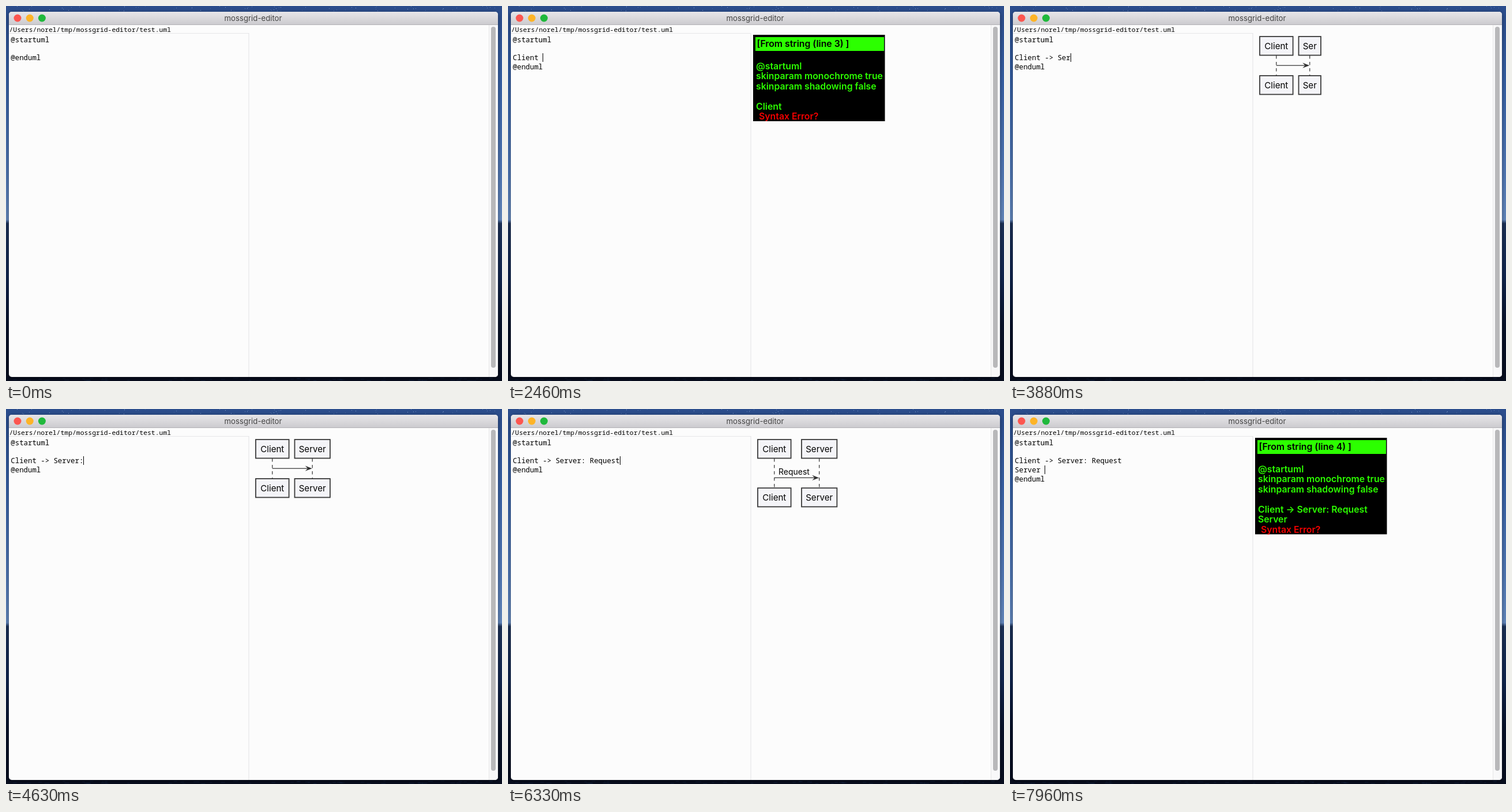
Animation of 860 by 651 pixels, one loop 8 s. Source, as an HTML page with a canvas:

```html
<!DOCTYPE html>
<html lang="en">
<head>
<meta charset="utf-8">
<title>Diagram editor</title>
<style>
  html, body { margin: 0; width: 100%; height: 100%; overflow: hidden; background: #0a1226; }
  canvas { display: block; width: 860px; height: 651px; }
</style>
</head>
<body>
<canvas id="stage" width="860" height="651"></canvas>
<script>
const ctx = document.getElementById('stage').getContext('2d');
const W = 860, H = 651, LOOP = 8000;
const SANS = 'Inter, "Noto Sans", sans-serif';
const MONO = '"Noto Sans Mono", "DejaVu Sans Mono", monospace';
const GREEN = '#2cff00', INK = '#303030';
const RENDER_LAG = 80;

// Keystrokes: [text, time of the first key, time between keys]
const BURSTS = [
  ['\n', 500, 0], ['Client', 900, 210], [' ', 2250, 0], ['->', 2650, 250],
  [' ', 3250, 0], ['Server', 3450, 160], [':', 4500, 0], [' ', 4850, 0],
  ['Request', 5100, 180], ['\n', 6600, 0], ['Server', 6900, 150], [' ', 7850, 0]
];
const KEYS = BURSTS.flatMap(([text, start, step]) =>
  [...text].map((key, i) => ({ key, at: start + i * step })));

function typedAt(t) {
  return KEYS.filter(k => k.at <= t).map(k => k.key).join('');
}

function seeded(seed) {
  return () => (seed = (seed * 16807) % 2147483647) / 2147483647;
}

function rect(x, y, w, h, fill) {
  ctx.fillStyle = fill;
  ctx.fillRect(x, y, w, h);
}

function roundRect(x, y, w, h, r, fill) {
  ctx.fillStyle = fill;
  ctx.beginPath();
  ctx.roundRect(x, y, w, h, r);
  ctx.fill();
}

function label(str, x, y, font, color, align = 'left') {
  ctx.font = font;
  ctx.fillStyle = color;
  ctx.textAlign = align;
  ctx.fillText(str, x, y);
}

function vertical(y0, y1, stops) {
  const g = ctx.createLinearGradient(0, y0, 0, y1);
  stops.forEach(([at, color]) => g.addColorStop(at, color));
  return g;
}

function drawDesktop() {
  rect(0, 0, W, H, vertical(0, H, [
    [0, '#2b4d8c'], [0.2, '#3761a6'], [0.45, '#5279b6'], [0.57, '#6489bf'],
    [0.58, '#1c3157'], [0.72, '#11264f'], [0.85, '#08122a'], [1, '#070d1e']
  ]));
  const rnd = seeded(71);
  for (let i = 0; i < 70; i++) {
    ctx.globalAlpha = 0.15 + rnd() * 0.45;
    rect(Math.floor(rnd() * W), Math.floor(rnd() * 9), 1, 1, '#c9dcff');
  }
  for (let i = 0; i < 60; i++) {
    ctx.globalAlpha = 0.25;
    rect(rnd() * W, 645 + rnd() * 6, 3 + rnd() * 8, 1, '#28477e');
  }
  ctx.globalAlpha = 1;
}

function drawWindow() {
  ctx.save();
  ctx.shadowColor = 'rgba(0,0,0,0.45)';
  ctx.shadowBlur = 8;
  ctx.shadowOffsetY = 2;
  roundRect(5, 10, 848, 634, 5, '#fcfcfc');
  ctx.restore();

  roundRect(5, 10, 848, 23, [5, 5, 0, 0],
    vertical(10, 33, [[0, '#e7e6e9'], [1, '#cbcace']]));
  rect(5, 32, 848, 1, '#b3b2b6');
  ['#fc5650', '#fdb427', '#20b93c'].forEach((color, i) => {
    ctx.fillStyle = color;
    ctx.beginPath();
    ctx.arc(20 + i * 21.2, 21, 6.5, 0, Math.PI * 2);
    ctx.fill();
  });
  label('mossgrid-editor', 428.5, 26, '13.2px ' + SANS, '#444', 'center');

  rect(5, 47, 416, 1, '#e6e6e8');
  rect(420.5, 47, 1, 597, '#e2e2e4');
  roundRect(837, 33, 16, 611, [0, 0, 5, 0], '#f8f8f9');
  rect(837, 33, 1, 611, '#e6e6e7');
  roundRect(841, 36, 8, 592, 4, '#b8b8ba');
  label('/Users/norel/tmp/mossgrid-editor/test.uml', 5.5, 45, '11.42px ' + MONO, '#000');
}

function drawEditor(typed, t) {
  const x = 8.3, advance = 7.42;
  const lines = ['@startuml', ...typed.split('\n'), '@enduml'];
  lines.forEach((line, i) =>
    label(line, x, 62.5 + i * 15.8, '12.37px ' + MONO, '#000'));

  const last = KEYS.filter(k => k.at <= t).pop();
  if (!last || (t - last.at) % 1000 >= 500) return;
  const row = lines.length - 2;
  rect(Math.round(x + lines[row].length * advance), Math.round(50.5 + row * 15.8), 1, 15, '#000');
}

function drawError(source) {
  const font = '600 15.8px ' + SANS;
  const lineNo = source.length + 2;
  const body = ['@startuml', 'skinparam monochrome true', 'skinparam shadowing false', '', ...source];
  rect(425, 50, 228.5, 132.5 + source.length * 17.5, '#000');
  rect(429, 54, 223, 24, GREEN);
  label(`[From string (line ${lineNo}) ]`, 431.5, 71, font, '#000');
  body.forEach((line, i) => label(line, 430, 110 + i * 17.45, font, GREEN));
  label('Syntax Error?', 435, 110 + body.length * 17.45, font, '#f40000');
}

function participant(name, cx, w, y) {
  rect(cx - w / 2, y, w, 32.5, '#f4f4f8');
  ctx.strokeStyle = '#3a3a3a';
  ctx.lineWidth = 1.8;
  ctx.strokeRect(cx - w / 2, y, w, 32.5);
  label(name, cx, y + 21.7, '15.1px ' + SANS, '#000', 'center');
}

function lifeline(x, y0, y1) {
  ctx.strokeStyle = INK;
  ctx.lineWidth = 1.2;
  ctx.setLineDash([5.5, 5.5]);
  ctx.beginPath();
  ctx.moveTo(x, y0);
  ctx.lineTo(x, y1);
  ctx.stroke();
  ctx.setLineDash([]);
}

function arrow(x0, x1, y) {
  rect(x0, y - 0.6, x1 - x0 - 4, 1.2, INK);
  ctx.fillStyle = INK;
  ctx.beginPath();
  [[0, 0], [-12, -4.6], [-7.5, 0], [-12, 4.6]].forEach(([dx, dy]) => ctx.lineTo(x1 + dx, y + dy));
  ctx.fill();
}

function drawSequence(to, message) {
  const cx = 461.8, top = 53, drop = message ? 16.2 : 0;
  const bottom = 121 + drop, y = 103.2 + drop;
  const boxW = 15.5 + to.length * 7.65;
  const messageW = message.length * 7.7;
  const tx = Math.max(500.5 + boxW / 2, message ? cx + messageW + 24 : 0);
  const people = [['Client', cx, 57.6]];
  if (to) people.push([to, tx, boxW]);

  people.forEach(([name, x, w]) => {
    lifeline(x, top + 33, bottom);
    participant(name, x, w, top);
    participant(name, x, w, bottom);
  });
  arrow(cx, to ? tx - 0.5 : 494.5, y);
  if (message) label(message, 469, y - 5, '14px ' + SANS, '#000');
}

function drawPreview(typed) {
  const source = typed.split('\n').map(s => s.trimEnd()).filter(Boolean);
  if (!source.length) return;
  const parsed = source.map(s => /^Client ->\s*(\w*):?\s*(.*)$/.exec(s));
  if (parsed.every(Boolean)) drawSequence(parsed[0][1], parsed[0][2]);
  else drawError(source);
}

function frame(now) {
  const t = now % LOOP;
  drawDesktop();
  drawWindow();
  drawEditor(typedAt(t), t);
  drawPreview(typedAt(t - RENDER_LAG));
  requestAnimationFrame(frame);
}
requestAnimationFrame(frame);
</script>
</body>
</html>
```
